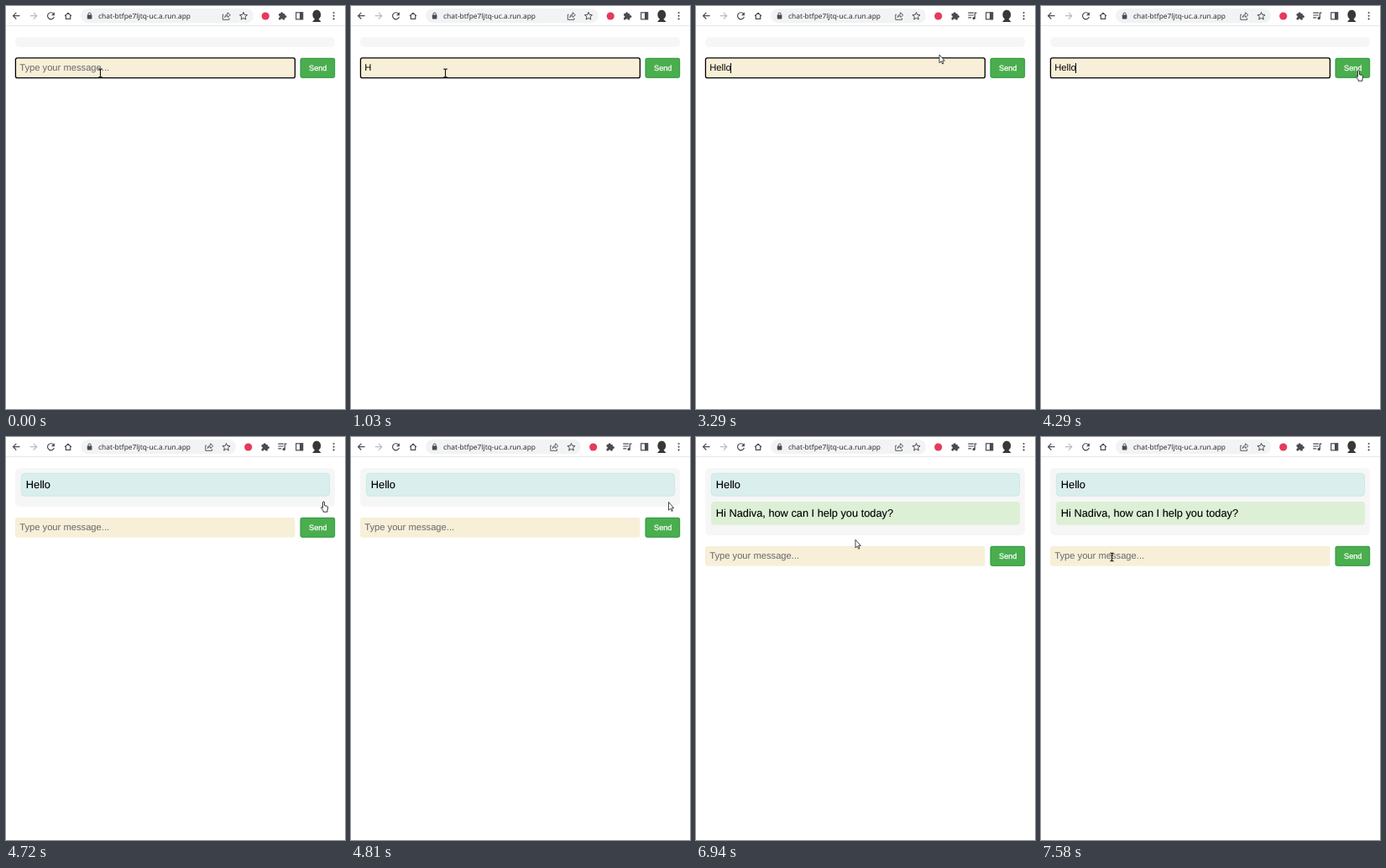
An HTML page for the animation above (8000 ms loop, 404 px wide and 480 px high).

```html
<!DOCTYPE html>
<html lang="en">
<head>
<meta charset="utf-8">
<title>Chat</title>
<style>
  html, body { margin: 0; width: 100%; height: 100%; overflow: hidden; background: #fff; }
  svg { display: block; width: 404px; height: 480px; }
  text { font-family: "Liberation Sans", Arial, sans-serif; white-space: pre; text-rendering: geometricPrecision; }
  .icon { fill: none; stroke: #484c51; stroke-width: 1.2; }
  .solid { fill: #484c51; stroke: none; }
  .msg { font-size: 12.8px; fill: #000; stroke: #000; stroke-width: .12; }
  .field { font-size: 11.2px; }
  .url { font: 8.4px "Noto Sans", "Open Sans", sans-serif; fill: #2b2d31; }
  .send { font-size: 9.2px; fill: #fff; stroke: #fff; stroke-width: .25; }
</style>
</head>
<body>
<svg viewBox="0 0 404 480" xmlns="http://www.w3.org/2000/svg">
  <!-- toolbar -->
  <rect y="23" width="404" height="1" fill="#e6e7e8"/>
  <rect id="pill" x="89" y="3" width="206" height="17.2" rx="8.6" fill="#f1f3f4"/>
  <g class="icon">
    <path d="M16.5 11.7H8.6M12.3 7.9L8.5 11.7l3.8 3.8"/>
    <path d="M28.7 11.7H36.6M32.9 7.9l3.8 3.8-3.8 3.8" style="stroke:#b9bcc0"/>
    <path d="M56.6 9.2A4 4 0 1 0 57.4 12.8"/>
    <path class="solid" d="M57.9 7.3V11.3H53.9Z"/>
    <path d="M70 11.9L74 8.2l4 3.7M71.3 11V15.4H76.7V11"/>
    <rect class="solid" x="96.8" y="10.6" width="5.6" height="4.9" rx=".7"/>
    <path d="M98 10.8V9.6a1.6 1.6 0 0 1 3.2 0V10.8" stroke-width="1"/>
  </g>
  <text class="url" x="110" y="15">chat-btfpe7ljtq-uc.a.run.app</text>
  <g id="tools" class="icon">
    <path d="M259.6 10.2H258.3V16.3H266V14.3M260.8 13.6C261 11 262.6 9.9 264.2 9.9V7.8L267.4 10.7 264.2 13.5V11.7C262.6 11.7 261.6 12.3 260.8 13.6Z" style="stroke-width:.9"/>
    <path id="star" style="stroke-width:1"/>
    <circle cx="309.2" cy="12" r="4.6" fill="#e63a5c" stroke="none"/>
    <g class="solid">
      <rect x="325" y="9.1" width="7.4" height="7.3" rx=".9"/>
      <circle cx="328.6" cy="8.7" r="1.5"/>
      <circle cx="332.9" cy="12.6" r="1.5"/>
      <circle cx="325" cy="12.8" r="1.3" fill="#fff"/>
      <circle cx="328.6" cy="16.5" r="1.3" fill="#fff"/>
    </g>
  </g>
  <g id="list" class="icon">
    <path d="M324.3 8.2H330.8M324.3 11H330.8M324.3 13.8H328.2M332.3 14.6V8.2H334.5"/>
    <circle class="solid" cx="331.2" cy="14.6" r="1.7"/>
  </g>
  <g class="icon">
    <rect x="345.7" y="7.8" width="8" height="8"/>
    <rect class="solid" x="350" y="7.5" width="4" height="8.6"/>
    <path class="solid" d="M365.4 10.5C365.4 2.8 375.2 2.8 375.2 10.5 375.2 13 374 14.6 372.5 15.5L375.6 19H365L368.1 15.5C366.6 14.6 365.4 13 365.4 10.5Z" style="fill:#3a3836"/>
    <g class="solid"><circle cx="390.6" cy="8" r="1.05"/><circle cx="390.6" cy="11.7" r="1.05"/><circle cx="390.6" cy="15.4" r="1.05"/></g>
  </g>

  <!-- conversation -->
  <rect id="panel" x="11" y="37" width="381" height="12" rx="5" fill="#f6f6f6"/>
  <g id="msg1">
    <rect x="18.3" y="43.3" width="367.3" height="27" rx="4" fill="#daeeed" stroke="#c0e9e6" stroke-width=".8"/>
    <text class="msg" x="23.8" y="61">Hello</text>
  </g>
  <g id="msg2">
    <rect x="18" y="77" width="368" height="27.7" rx="4" fill="#ddefd5"/>
    <text class="msg" x="23.8" y="95">Hi Nadiva, how can I help you today?</text>
  </g>

  <!-- entry row -->
  <g id="row">
    <rect x="11" y="62" width="333.5" height="23.8" rx="3" fill="#f7efd8"/>
    <rect id="ring" x="11.4" y="61.9" width="333" height="23.7" rx="2.2" fill="none" stroke="#000" stroke-width="1.3"/>
    <text id="hint" class="field" x="16.2" y="77.4" fill="#66686a">Type your message...</text>
    <text id="typed" class="field" x="16.2" y="77.4"></text>
    <rect id="caret" y="68" width="1" height="12"/>
    <rect x="351" y="62.3" width="40.7" height="23" rx="1.8" fill="#4aae4e" stroke="#26953a"/>
    <text class="send" x="361" y="77">Send</text>
  </g>

  <!-- pointers, hot spot at 0,0 -->
  <g id="pointer">
    <path id="beam" d="M-2.2-4.7H-.8L0-4.2 .8-4.7H2.2M0-4.2V4.2M-2.2 4.7H-.8L0 4.2 .8 4.7H2.2" fill="none" stroke="#111" stroke-width="1.1"/>
    <path id="arrow" d="M0 0V9.7L2.2 7.8 3.7 11 5 10.4 3.6 7.2H6.3Z" fill="#fff" stroke="#333" stroke-width=".9"/>
    <path id="hand" d="M-1 7V.4C-1-1 1-1 1 .4V4.2L4.2 4.9C5 5.2 5.3 5.7 5.2 6.6L4.5 9.5V11.7H-.4V10.3L-2.9 7C-3.2 5.7-2 5.5-1 7Z" fill="#fff" stroke="#222" stroke-width=".9"/>
  </g>
</svg>
<script>
const LOOP = 8000;
const $ = id => document.getElementById(id);
const show = (id, on) => $(id).style.display = on ? "" : "none";

// [time, value] tables, each value holds until the next time
const TYPED = [[0, ""], [630, "H"], [2030, "He"], [2130, "Hell"], [2360, "Hello"], [4720, ""]];
const CARET = [[0, 0], [430, 1], [1030, 0], [1630, 1], [2760, 0], [3260, 1], [3890, 0], [4290, 1], [4520, 0]];
const COUNT = [[0, 0], [4720, 1], [5540, 2]];

// pointer moves: n updates between from and to; points are [time, x, y]
const MOVES = [
  { from: 2960, to: 3560, n: 19, pts: [[2927, 112.5, 79.8], [3060, 150, 73], [3160, 214, 65], [3260, 290, 58],
    [3340, 350, 56], [3420, 387, 72], [3480, 391, 84.5], [3560, 378.5, 77.5]] },
  { from: 6540, to: 7340, n: 17, pts: [[6490, 378.5, 77.5], [6600, 358, 81], [6740, 288, 98], [6940, 190, 122.3],
    [7080, 133, 138], [7200, 104, 147], [7340, 89, 143]] },
  { from: 7370, to: 7580, n: 8, pts: [[7340, 89, 143], [7460, 86, 140.7], [7580, 84.5, 143]] }
];

const at = (table, t) => table.reduce((v, row) => t >= row[0] ? row[1] : v, table[0][1]);

function along(pts, t) {
  if (t <= pts[0][0]) return pts[0].slice(1);
  for (let i = 1; i < pts.length; i++) {
    const [t0, x0, y0] = pts[i - 1], [t1, x1, y1] = pts[i];
    if (t <= t1) {
      const k = (t - t0) / (t1 - t0);
      return [x0 + (x1 - x0) * k, y0 + (y1 - y0) * k];
    }
  }
  return pts[pts.length - 1].slice(1);
}

function pointerAt(t) {
  const move = MOVES.filter(m => t >= m.from).pop();
  if (!move) return MOVES[0].pts[0].slice(1);
  const step = (move.to - move.from) / (move.n - 1);
  const i = Math.min(move.n - 1, Math.floor((t - move.from) / step + 1e-6));
  return along(move.pts, move.from + i * step);
}

function pointerKind(x, y, shift) {
  const inRow = y >= 62 + shift && y <= 86 + shift;
  if (inRow && x >= 11 && x <= 344.5) return "beam";
  if (inRow && x >= 350.5 && x <= 392) return "hand";
  return "arrow";
}

function starPath(cx, cy, r) {
  let d = "";
  for (let i = 0; i < 10; i++) {
    const a = i * Math.PI / 5, q = i % 2 ? r * 0.45 : r;
    d += (i ? "L" : "M") + (cx + q * Math.sin(a)).toFixed(2) + " " + (cy - q * Math.cos(a)).toFixed(2);
  }
  return d + "Z";
}
$("star").setAttribute("d", starPath(283, 12.2, 4.8));

const shiftFor = count => count * 34;

function draw(t) {
  const wide = t < 2030, count = at(COUNT, t), text = at(TYPED, t);
  $("pill").setAttribute("width", wide ? 206 : 185);
  $("tools").setAttribute("transform", `translate(${wide ? 0 : -20.5} 0)`);
  show("list", !wide);

  $("panel").setAttribute("height", 12 + shiftFor(count));
  show("msg1", count > 0);
  show("msg2", count > 1);
  $("row").setAttribute("transform", `translate(0 ${shiftFor(count)})`);
  show("ring", t < 4520);
  show("hint", !text);
  $("typed").textContent = text;
  const width = text ? $("typed").getComputedTextLength() : 0;
  $("caret").setAttribute("x", Math.floor(16.2 + width));
  show("caret", at(CARET, t));

  // the pointer shape follows the layout a moment late
  const [x, y] = pointerAt(t);
  const kind = pointerKind(x, y, shiftFor(at(COUNT, t - 90)));
  for (const id of ["beam", "arrow", "hand"]) show(id, id === kind);
  $("pointer").setAttribute("transform", `translate(${x.toFixed(1)} ${y.toFixed(1)})`);
}

const start = performance.now();
function frame() {
  draw((performance.now() - start) % LOOP);
  requestAnimationFrame(frame);
}
draw(0);
requestAnimationFrame(frame);
</script>
</body>
</html>
```
